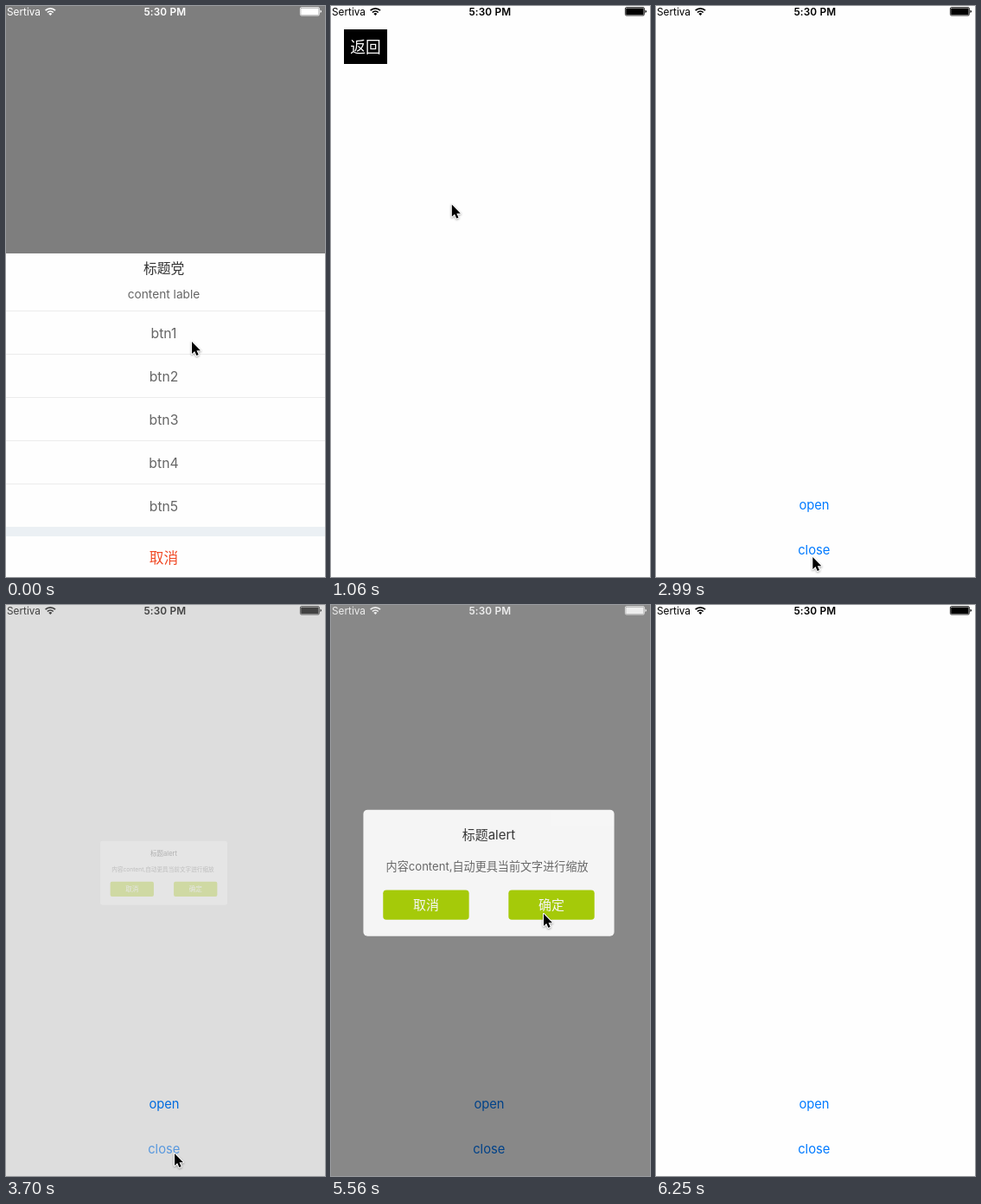
An HTML page that plays this animation: 369x660 px, repeating every 6.97 s.

```html
<!DOCTYPE html>
<html lang="zh-CN">
<head>
<meta charset="utf-8">
<title>Sheet and alert</title>
<style>
html, body { margin: 0; width: 100%; height: 100%; overflow: hidden; background: #fefefe; }
svg { display: block; width: 369px; height: 660px; }
text { font-family: Inter, "Noto Sans CJK SC", "Noto Sans CJK", sans-serif; text-anchor: middle; }
</style>
</head>
<body>
<svg id="stage" viewBox="0 0 369 660">
  <g id="home"></g>
  <g id="page"></g>
  <rect id="dim" width="369" height="660"/>
  <g id="sheet"></g>
  <g id="alert"></g>
  <g id="status">
    <g id="labels"></g>
    <g fill="none" stroke="currentColor" stroke-width="1.7">
      <path d="M45.6 5.2A8.2 8.2 0 0 1 57 5.2"/>
      <path d="M47.9 7.5A4.9 4.9 0 0 1 54.7 7.5"/>
    </g>
    <path d="M51.3 11.1L49.3 9.1A2.8 2.8 0 0 1 53.3 9.1Z" fill="currentColor"/>
    <rect x="340.4" y="1.6" width="22" height="9.4" rx="1.4" fill="none" stroke="currentColor" stroke-width=".8"/>
    <rect x="341.2" y="2.4" width="20.4" height="7.8" rx=".6" fill="currentColor"/>
    <path d="M363.5 4.6Q365 5 365 6.3T363.5 8Z" fill="currentColor"/>
  </g>
  <path id="cursor" d="M0 0V14L3.2 11 5.4 16 7.7 15 5.5 10.2H10Z" fill="#000" stroke="#fff"
    stroke-width="2" stroke-linejoin="round" paint-order="stroke"
    style="filter: drop-shadow(0 1px 1px rgba(0,0,0,.35))"/>
</svg>
<script>
const LOOP = 6970;
const $ = id => document.getElementById(id);

function add(parent, tag, attrs, content) {
  const node = document.createElementNS('http://www.w3.org/2000/svg', tag);
  for (const key in attrs) node.setAttribute(key, attrs[key]);
  if (content) node.textContent = content;
  return $(parent).appendChild(node);
}
const label = (parent, content, x, y, size, fill, more) =>
  add(parent, 'text', { x, y, 'font-size': size, fill, ...more }, content);
const box = (parent, x, y, width, height, fill, rx = 0) =>
  add(parent, 'rect', { x, y, width, height, fill, rx });

// Home screen and the pushed page
label('home', 'open', 183, 581.5, 14.76, '#007aff');
const closeLabel = label('home', 'close', 182.8, 633.5, 14.76, '#007aff');
box('page', 0, 0, 369, 660, '#fefefe');
box('page', 15, 16, 50, 40, '#000');
label('page', '返回', 40, 42.8, 17.7, '#fff');

// Action sheet
box('sheet', 0, 286, 369, 374, '#fefefe');
const pressedRow = box('sheet', 0, 353, 369, 50, '#ebebeb');
label('sheet', '标题党', 182.6, 309, 15.75, '#333');
label('sheet', 'content lable', 182.5, 337.6, 13.7, '#666');
for (let i = 0; i < 5; i++) {
  box('sheet', 0, 352 + 50 * i, 369, 1, '#ececec');
  label('sheet', 'btn' + (i + 1), 182.5, 383.6 + 50 * i, 15.75, '#666');
}
box('sheet', 0, 602, 369, 11, '#ebf0f4');
label('sheet', '取消', 182.5, 644, 16.7, '#f04a26');

// Alert
box('alert', 30, 233, 305, 153.5, '#fefefe', 5);
label('alert', '标题alert', 182.5, 268.6, 15.75, '#333');
label('alert', '内容content,自动更具当前文字进行缩放', 180.5, 307, 13.78, '#666');
for (const [x, name] of [[54, '取消'], [206.5, '确定']]) {
  box('alert', x, 330.5, 104.5, 36, '#a8cf00', 4);
  label('alert', name, x + 52.3, 354.2, 15.75, '#fff');
}

// Status bar
label('labels', 'Sertiva', 1, 10.6, 11.8, 'currentColor', { style: 'text-anchor:start' });
label('labels', '5:30 PM', 183.8, 10.6, 11.8, 'currentColor', { 'font-weight': 600, 'letter-spacing': .15 });

// Bursts of screen updates: start, end, number of updates
const bursts = [
  [90, 170, 2], [350, 970, 8], [1060, 1500, 6], [1950, 2470, 7], [2650, 3250, 8],
  [3520, 4140, 8], [4220, 4400, 3], [5030, 5210, 3], [5480, 5810, 5], [5990, 6250, 4]
];
function lastUpdate(t) {
  let held = 0;
  for (const [from, to, count] of bursts) {
    for (let i = 0; i < count; i++) {
      const at = Math.floor((from + (to - from) * i / (count - 1)) / 10) * 10;
      if (at <= t) held = at;
    }
  }
  return held;
}

// Pointer path: time, x, y
const path = [
  [0, 215, 388], [170, 217, 386.5], [610, 217, 386.5], [970, 159, 268], [1500, 46, 41],
  [1950, 46, 41], [2470, 186, 510], [2560, 186, 510], [2800, 168, 580], [3000, 182, 640],
  [3250, 195, 634], [3700, 195, 634], [4140, 163, 373], [4400, 127, 347], [4940, 127, 347],
  [5210, 246, 357], [5900, 246, 357], [6160, 269, 636], [LOOP, 269, 636]
];
function pointer(t) {
  const i = path.findIndex(p => p[0] > t);
  const [a, b] = [path[i - 1], path[i]];
  const k = (t - a[0]) / (b[0] - a[0]);
  return [a[1] + (b[1] - a[1]) * k, a[2] + (b[2] - a[2]) * k];
}

const clamp = k => Math.min(1, Math.max(0, k));
const ease = (t, start, length) => {
  const k = clamp((t - start) / length);
  return k * k * (3 - 2 * k);
};
const settle = (t, start) => t < start ? 0 : 1 - Math.exp((start - t) / 80);
const move = (id, x, y) => $(id).setAttribute('transform', `translate(${x} ${y})`);
const show = (id, on) => { $(id).style.display = on ? '' : 'none'; };

function draw(time) {
  const t = lastUpdate(time);

  const sheetOut = ease(t, 425, 300);
  move('sheet', 0, 374 * sheetOut);
  show('sheet', sheetOut < 1);
  pressedRow.style.display = t >= 350 ? '' : 'none';

  const leaving = t >= 1850;
  const pageY = 660 * (leaving ? settle(t, 1850) : 1 - settle(t, 730));
  move('page', 0, t >= 1060 && t < 1850 ? Math.round(pageY) : pageY);
  show('page', t >= 730 && t < 2470);

  const alertIn = ease(t, 3590, 300) - ease(t, 5512, 298);
  const scale = .3 + .7 * alertIn;
  $('alert').setAttribute('transform',
    `translate(182.5 309.7) scale(${scale}) translate(-182.5 -309.7)`);
  $('alert').style.opacity = alertIn;
  show('alert', alertIn > 0);

  const dark = 1 - sheetOut + alertIn;
  $('dim').setAttribute('fill-opacity', dark / 2);
  const shade = Math.round(255 * dark);
  $('status').style.color = `rgb(${shade},${shade},${shade})`;

  closeLabel.style.opacity = t < 3520 ? 1 : .2 + .8 * clamp((t - 3550) / 280);

  move('cursor', ...pointer(t));
  show('cursor', t < 6250);
}

const begin = performance.now();
function tick() {
  draw((performance.now() - begin) % LOOP);
  requestAnimationFrame(tick);
}
tick();
</script>
</body>
</html>
```
